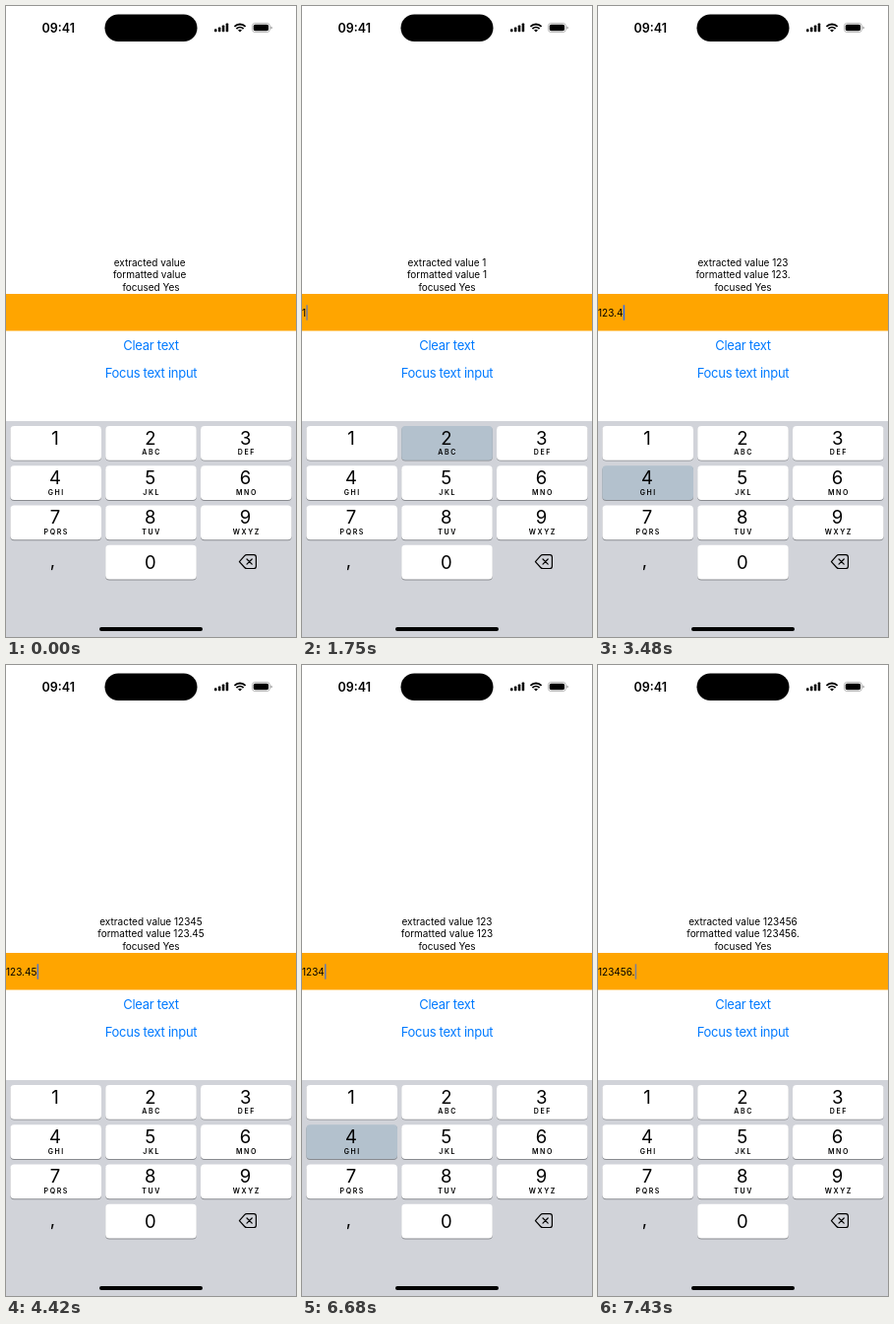
Recreate the animation shown at these times as an HTML page. Size 295x640 px, loop 8000 ms.

```html
<!DOCTYPE html>
<html lang="en">
<head>
<meta charset="utf-8">
<title>Masked number input</title>
<style>
  html, body { margin: 0; width: 100%; height: 100%; overflow: hidden; background: #fff; }
  svg { display: block; width: 295px; height: 640px; font-family: Inter, Roboto, sans-serif; }
  .label { font-size: 10px; text-anchor: middle; }
  .link { font-size: 13px; letter-spacing: -.27px; text-anchor: middle; fill: #007aff; }
  .digit { font-size: 18.5px; text-anchor: middle; }
  .letters { font-size: 7px; font-weight: 600; letter-spacing: 1.6px; text-anchor: middle; }
  .key { fill: #fff; }
  .key.down { fill: #b3c1cd; }
  #del path { stroke: #000; stroke-width: 1.2; stroke-linejoin: round; stroke-linecap: round; fill: none; }
  #del.down .body { fill: #000; }
  #del.down .cross { stroke: #d1d3d9; }
</style>
</head>
<body>
<svg viewBox="0 0 295 640">
  <rect width="295" height="640" fill="#fff"/>

  <text x="36.5" y="26.6" font-size="12.5" font-weight="600">09:41</text>
  <rect x="100.5" y="8.5" width="94" height="27.5" rx="13.75"/>
  <g id="signal"></g>
  <g fill="none" stroke="#000" stroke-width="1.8">
    <path d="M232.4 20.8a8 8 0 0 1 11.2 0M234.4 23.1a5.2 5.2 0 0 1 7.2 0"/>
    <path d="M238 26.6l-2-2a2.9 2.9 0 0 1 4 0z" fill="#000" stroke="none"/>
  </g>
  <rect x="250.4" y="17.4" width="18" height="9.2" rx="3" fill="none" stroke="#000" stroke-opacity=".35" stroke-width=".8"/>
  <rect x="251.7" y="18.7" width="15.4" height="6.6" rx="1.8"/>
  <path d="M269.4 20.5q1.5 .5 1.5 1.5t-1.5 1.5z" fill-opacity=".4"/>

  <text id="extracted" class="label" x="147.5" y="263.8"></text>
  <text id="formatted" class="label" x="147.5" y="276.4"></text>
  <text class="label" x="147.5" y="289.2">focused Yes</text>

  <rect y="292" width="295" height="37.5" fill="#ffa500"/>
  <text id="input" y="314.5" font-size="10"></text>
  <rect id="caret" y="303.3" width="1.5" height="15.4" fill="#2f6bf0"/>

  <text class="link" x="147.5" y="349">Clear text</text>
  <text class="link" x="147.5" y="377.3">Focus text input</text>

  <rect y="421" width="295" height="219" fill="#d1d3d9"/>
  <g id="keys"></g>
  <text class="digit" x="47.5" y="569">,</text>
  <g id="del">
    <path class="body" d="M237.4 563.6l5.3-5.9q.9-1 2.2-1h7.2q2.3 0 2.3 2.3v9.2q0 2.3-2.3 2.3h-7.2q-1.3 0-2.2-1z"/>
    <path class="cross" d="M245 561l5.2 5.2m0-5.2l-5.2 5.2"/>
  </g>
  <rect x="95" y="630" width="105" height="4" rx="2"/>
</svg>
<script>
const LOOP = 8000;
const $ = id => document.getElementById(id);

function add(parent, tag, attrs, text = '') {
  const el = document.createElementNS('http://www.w3.org/2000/svg', tag);
  for (const name in attrs) el.setAttribute(name, attrs[name]);
  el.textContent = text;
  return parent.appendChild(el);
}

[3, 4.7, 6.7, 8.8].forEach((height, i) =>
  add($('signal'), 'rect', { x: 212 + i * 3.9, y: 26.3 - height, width: 2.5, height, rx: .7 }));

const letters = ['', '', 'ABC', 'DEF', 'GHI', 'JKL', 'MNO', 'PQRS', 'TUV', 'WXYZ'];
const keys = {};

function addKey(digit, col, row) {
  const x = 4.4 + col * 96.8, y = 425.9 + row * 40.3, mid = x + 46.3;
  const box = { x, width: 92.6, height: 34.8, rx: 4 };
  add($('keys'), 'rect', { ...box, y: y + .9, fill: '#898b90' });
  keys[digit] = add($('keys'), 'rect', { ...box, y, class: 'key' });
  add($('keys'), 'text', { class: 'digit', x: mid - .7, y: y + (digit ? 18.8 : 24) }, digit);
  add($('keys'), 'text', { class: 'letters', x: mid + .6, y: y + 29.4 }, letters[digit]);
}

for (let n = 1; n <= 9; n++) addKey(n, (n - 1) % 3, Math.floor((n - 1) / 3));
addKey(0, 1, 3);
keys.del = $('del');

// Each step changes only the listed properties; a pressed key lasts one step.
const steps = [
  [0, { text: '', value: '', caret: 0 }],
  [200, { caret: .5 }],
  [320, { caret: 1 }],
  [870, { caret: .5 }],
  [980, { caret: 0 }],
  [1220, { caret: .5 }],
  [1340, { caret: 1 }],
  [1460, { text: '1', key: 1 }],
  [1750, { value: '1', key: 2, caret: .65 }],
  [1880, { text: '12', value: '12', caret: 1 }],
  [2150, { key: 3 }],
  [2270, { text: '123', value: '123' }],
  [2840, { text: '123.' }],
  [3360, { value: '123.' }],
  [3480, { text: '123.4', key: 4 }],
  [3820, { value: '123.4', key: 5 }],
  [3970, { text: '123.45', value: '123.45' }],
  [4420, { caret: .85 }],
  [4530, { caret: 0 }],
  [4770, { caret: .5 }],
  [4890, { caret: 1 }],
  [5080, { text: '123.4', key: 'del' }],
  [5210, { value: '123.4' }],
  [5510, { text: '123.', key: 'del' }],
  [5660, { value: '123.' }],
  [5930, { text: '123', key: 'del' }],
  [6090, { value: '123' }],
  [6550, { caret: .5 }],
  [6680, { text: '1234', key: 4, caret: .75 }],
  [6930, { value: '1234', key: 5, caret: 1 }],
  [7070, { text: '12345', value: '12345' }],
  [7320, { text: '123456', key: 6 }],
  [7430, { text: '123456.', value: '123456.', caret: .65 }]
];

let state = {};
const timeline = steps.map(([at, change]) => (state = { ...state, key: null, ...change, at }));

function show({ text, value, key, caret }) {
  $('extracted').textContent = 'extracted value\u00a0' + value.replace('.', '');
  $('formatted').textContent = 'formatted value\u00a0' + value;
  $('input').textContent = text;
  $('caret').setAttribute('x', text ? $('input').getComputedTextLength() + .2 : 0);
  $('caret').setAttribute('opacity', caret);
  for (const name in keys) keys[name].classList.toggle('down', name === String(key));
}

let current;
const start = performance.now();
function tick() {
  const time = (performance.now() - start) % LOOP;
  const next = timeline.findLast(step => step.at <= time);
  if (next !== current) show(current = next);
  requestAnimationFrame(tick);
}
tick();
</script>
</body>
</html>
```
